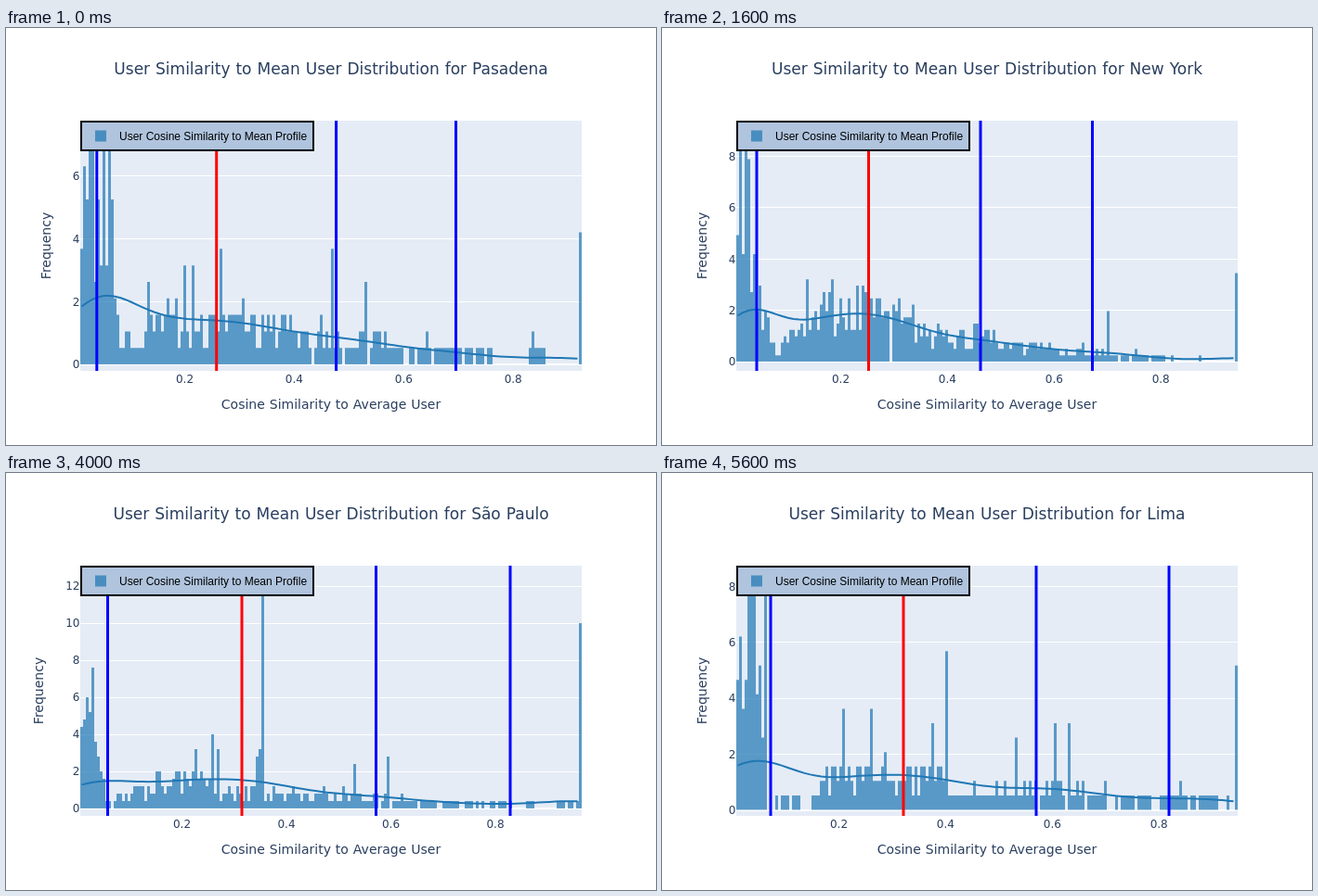
An HTML page for the animation above (6.4 s loop, 700 px wide and 450 px high).

```html
<!DOCTYPE html>
<html lang="en">
<head>
<meta charset="utf-8">
<title>User similarity distributions</title>
<style>
html, body { margin: 0; width: 100%; height: 100%; overflow: hidden; background: #fff; }
svg { display: block; width: 700px; height: 450px; }
text { font-family: Verdana, "DejaVu Sans", sans-serif; font-size: 12px; word-spacing: .034em; fill: #2a3f5f; }
.title { font-size: 17px; }
.label { font-size: 14px; }
.mid { text-anchor: middle; }
.end { text-anchor: end; }
.grid { stroke: #fff; shape-rendering: crispEdges; }
.bars { fill: #1f77b4; fill-opacity: .7; }
.kde { fill: none; stroke: #1f77b4; stroke-width: 2; stroke-linejoin: round; }
.rule { stroke-width: 3; }
.key { font-family: Arial, "Liberation Sans", sans-serif; word-spacing: 0; fill: #000; }
</style>
</head>
<body>
<svg id="stage" viewBox="0 0 700 450">
  <rect x="80" y="100" width="540" height="270" fill="#e5ecf6"/>
  <g id="slides"></g>
  <text class="label mid" x="350" y="411">Cosine Similarity to Average User</text>
  <rect x="81" y="101" width="250" height="31" fill="#b0c4de" stroke="#000" stroke-width="2"/>
  <rect class="bars" x="96" y="110.5" width="12" height="12"/>
  <text class="key" x="122" y="121">User Cosine Similarity to Mean Profile</text>
</svg>
<script>
const HOLD = 800, LEFT = 80, RIGHT = 620, TOP = 100, BOTTOM = 370, BIN_W = 3;
const BINS = (RIGHT - LEFT) / BIN_W;
const layer = document.getElementById('slides');
const slides = [];

function add(parent, tag, attrs, text) {
  const el = document.createElementNS('http://www.w3.org/2000/svg', tag);
  for (const k in attrs) el.setAttribute(k, attrs[k]);
  if (text !== undefined) el.textContent = text;
  return parent.appendChild(el);
}

function random(seed) {
  return () => {
    seed = (seed + 0x6D2B79F5) | 0;
    let t = Math.imul(seed ^ (seed >>> 15), 1 | seed);
    t = (t + Math.imul(t ^ (t >>> 7), 61 | t)) ^ t;
    return ((t ^ (t >>> 14)) >>> 0) / 4294967296;
  };
}

// Linear interpolation through a flat list of x, y pairs.
function lerp(points, x) {
  let i = 0;
  while (i < points.length - 4 && points[i + 2] < x) i += 2;
  const [x0, y0, x1, y1] = points.slice(i, i + 4);
  return y0 + (y1 - y0) * Math.min(1, (x - x0) / (x1 - x0));
}

// Noisy counts around the envelope, plus the tall single bins.
function counts({ city, shape, spikes }) {
  const rnd = random(city.length * 7);
  return Array.from({ length: BINS }, (_, i) => {
    const n = Math.floor(lerp(shape, i) * (0.5 + rnd()) + rnd());
    return spikes[i] ?? n;
  });
}

// Gaussian density of the bins, with Scott's bandwidth.
function density(bins, n, sd) {
  const h = sd * n ** -0.2 / BIN_W;
  const total = bins.reduce((a, b) => a + b);
  return x => bins.reduce((sum, c, i) => sum + c * Math.exp(-(((x - i) / h) ** 2) / 2), 0)
    * n / total / (h * Math.sqrt(2 * Math.PI));
}

// n: sample size; mean, sd in pixels; x: [pixel of 0.2, pixels per 0.2];
// y: [pixel of 0, pixels per 1, last tick]; shape: bin, mean count pairs.
function slide(s) {
  const g = add(layer, 'g', { visibility: slides.length ? 'hidden' : 'visible' });
  const [zero, scale, last] = s.y, [x0, dx] = s.x;
  add(g, 'text', { class: 'title mid', x: 350, y: 50 },
    `User Similarity to Mean User Distribution for ${s.city}`);
  add(g, 'text', { class: 'label mid', transform: `translate(${last > 9 ? 40 : 48} 235) rotate(-90)` }, 'Frequency');
  for (let v = 0; v <= last; v += 2) {
    const y = zero - v * scale;
    add(g, 'line', { class: 'grid', x1: LEFT, x2: RIGHT, y1: y, y2: y, 'stroke-width': v ? 1 : 2 });
    add(g, 'text', { class: 'end', x: 79.5, y: y + 4.3 }, v);
  }

  const bins = counts(s);
  const unit = scale * dx * 5 / (BIN_W * s.n);
  const bars = bins.map((c, i) => {
    const h = Math.min(c * unit, zero - TOP - 12);
    return c ? `M${LEFT + i * BIN_W},${zero}v${-h}h${BIN_W}v${h}z` : '';
  });
  add(g, 'path', { class: 'bars', d: bars.join('') });

  const kde = density(bins, s.n, s.sd), line = [];
  for (let i = 0; i < BINS; i += 2) line.push([LEFT + (i + 0.5) * BIN_W, zero - kde(i) * unit]);
  add(g, 'path', { class: 'kde', d: 'M' + line.join('L') });

  for (let k = 0; k < 4; k++) {
    add(g, 'text', { class: 'mid', x: x0 + k * dx, y: 383 }, (0.2 * (k + 1)).toFixed(1));
    const x = s.mean + (k - 1) * s.sd;
    add(g, 'line', { class: 'rule', x1: x, x2: x, y1: TOP, y2: BOTTOM, stroke: k === 1 ? '#f00' : '#00f' });
  }
  slides.push(g);
}

slide({
  city: 'Pasadena', n: 374, mean: 226.7, sd: 128.9, x: [192.5, 117.9], y: [363, 33.9, 6],
  shape: [0, 10.5, 10, 9, 13, 2, 20, .7, 26, 2.5, 60, 2.2, 75, 2.1, 97, .9, 105, 1.5, 125, .9, 146, .6, 150, 0, 159, 0, 162, 1.5, 167, 0],
  spikes: { 24: 5, 37: 6, 40: 6, 50: 7, 90: 7, 102: 5, 179: 8 }
});

slide({
  city: 'Chicago', n: 590, mean: 225, sd: 124, x: [192, 115.5], y: [362, 30.6, 8],
  shape: [0, 22, 5, 17, 11, 3, 20, 2.5, 36, 5, 60, 5, 80, 3, 120, 1.5, 150, .5, 179, .2],
  spikes: { 25: 9, 34: 11, 66: 9, 179: 17 }
});

slide({
  city: 'New York', n: 777, mean: 222.5, sd: 120.5, x: [192.5, 114.9], y: [360, 27.7, 8],
  shape: [0, 30, 4, 25, 8, 8, 13, 2, 17, 2.5, 22, 5.5, 34, 8, 48, 8.5, 60, 6, 66, 4, 90, 4, 97, 2.5, 120, 2, 135, 1, 152, .8, 160, .2, 179, .1],
  spikes: { 2: 17, 25: 13, 34: 13, 45: 12, 55: 0, 63: 9, 133: 8, 179: 14 }
});

slide({
  city: 'Paris', n: 550, mean: 234, sd: 130, x: [191, 114], y: [362, 24.8, 10],
  shape: [0, 24, 4, 20, 10, 3, 20, 2, 34, 5, 64, 4.5, 85, 2.5, 120, 1.3, 150, .5, 179, .2],
  spikes: { 29: 11, 39: 10, 65: 12, 179: 24 }
});

slide({
  city: 'London', n: 539, mean: 234.2, sd: 132.7, x: [191, 114.2], y: [362, 30.5, 8],
  shape: [0, 19, 4, 17, 7, 5, 14, 1, 19, 2.5, 25, 4.5, 34, 5, 46, 2.5, 55, 4, 64, 4.5, 75, 3, 90, 2, 108, 2, 120, 1.2, 150, .6, 154, .2, 177, .2],
  spikes: { 9: 10, 29: 13, 35: 8, 40: 10, 49: 8, 65: 9, 66: 11, 108: 5, 123: 5, 179: 21 }
});

slide({
  city: 'São Paulo', n: 469, mean: 254, sd: 144.5, x: [189.5, 112.5], y: [362, 20, 12],
  shape: [0, 15, 5, 17, 7, 5, 10, 1, 17, 1.2, 24, 3, 34, 4, 46, 3, 57, 2, 66, 2.3, 85, 2.2, 108, 1.5, 130, .5, 145, .8, 155, .3, 178, .4],
  spikes: { 41: 8, 47: 10, 49: 8, 63: 7, 64: 8, 65: 29, 98: 6, 110: 7, 179: 25 }
});

slide({
  city: 'Bangkok', n: 380, mean: 249.6, sd: 131.4, x: [191.5, 116.2], y: [362.8, 32.65, 8],
  shape: [0, 14, 5, 7, 8, 3.5, 13, 7, 14, .7, 23, .5, 26, 2, 36, 2.3, 66, 2.8, 84, 1.5, 94, 2.3, 122, 1.7, 126, .3, 133, .5, 150, 1, 179, .6],
  spikes: { 2: 2, 36: 7, 39: 7, 44: 7, 61: 6, 62: 6, 94: 5, 115: 5, 167: 4 }
});

slide({
  city: 'Lima', n: 370, mean: 260, sd: 143, x: [190.5, 114.9], y: [363.5, 30.1, 8],
  shape: [0, 9, 6, 11, 9, 6, 11, .5, 27, .5, 33, 2.3, 70, 2.3, 78, 1, 92, 1.6, 104, 1.2, 120, 1.8, 126, 1, 147, 1.1, 150, 0, 154, .9, 178, .4],
  spikes: { 10: 15, 38: 7, 48: 7, 70: 6, 75: 11, 100: 5, 114: 6, 119: 6, 179: 10 }
});

let shown = 0;
function tick() {
  const now = Math.floor(performance.now() / HOLD) % slides.length;
  if (now !== shown) {
    slides[shown].setAttribute('visibility', 'hidden');
    slides[now].setAttribute('visibility', 'visible');
    shown = now;
  }
  requestAnimationFrame(tick);
}
tick();
</script>
</body>
</html>
```
